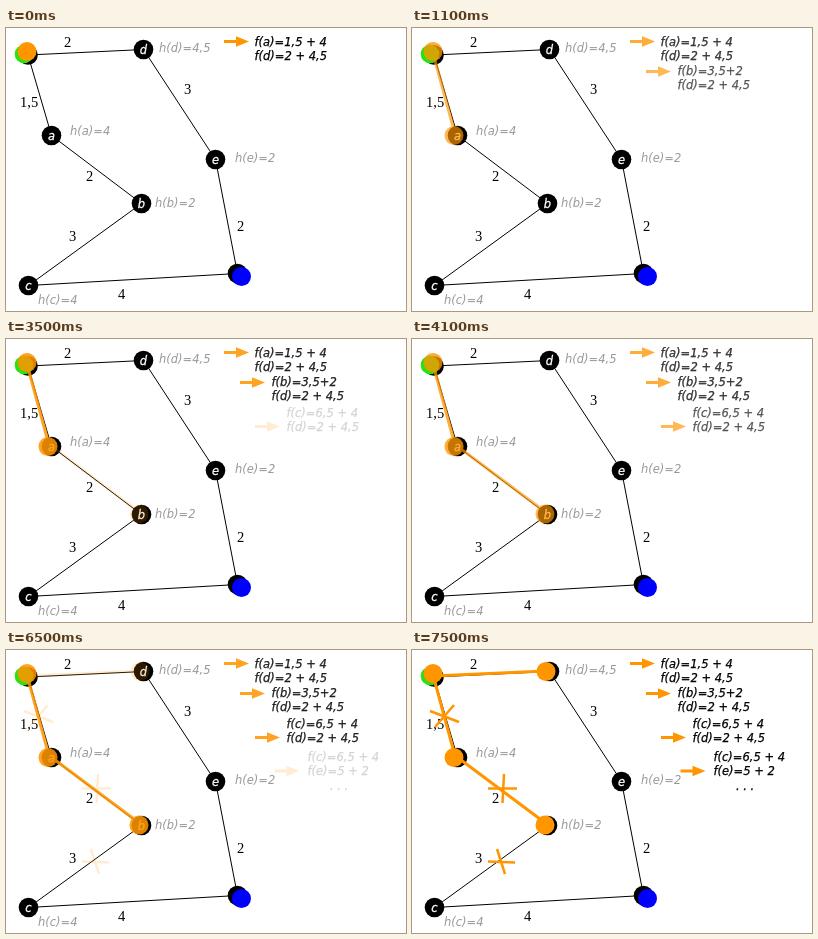
An HTML page that plays this animation: 400x283 px, repeating every 8 s.

```html
<!DOCTYPE html>
<html lang="en">
<head>
<meta charset="utf-8">
<title>Best-first path search</title>
<style>
  html, body { margin: 0; width: 100%; height: 100%; overflow: hidden; background: #fff; }
  svg { display: block; width: 400px; height: 283px; }
  text { font: italic 11.5px "DejaVu Sans", sans-serif; }
  .sum { stroke: #000; stroke-width: .25; }
  .hint { fill: #999; }
  .name { fill: #fff; stroke: #fff; stroke-width: .3; text-anchor: middle; }
  .cost { font: 14.5px "Liberation Serif", serif; }
  .edge { stroke: #000; stroke-width: 1; }
  .path { stroke: #ff9600; stroke-width: 3; }
  .cross { stroke: #ff9600; stroke-width: 2.5; }
</style>
</head>
<body>
<svg id="stage" viewBox="0 0 400 283"></svg>
<script>
const ORANGE = '#ff9600';
const stage = document.getElementById('stage');

const line = (cls, x1, y1, x2, y2) =>
  `<line class="${cls}" x1="${x1}" y1="${y1}" x2="${x2}" y2="${y2}"/>`;
const dot = (x, y, fill, r = 9.5) => `<circle cx="${x}" cy="${y}" r="${r}" fill="${fill}"/>`;
const text = (x, y, str, cls = 'sum') => `<text class="${cls}" x="${x}" y="${y}">${str}</text>`;
const arrow = (x, y) =>
  `<path fill="${ORANGE}" d="M${x} ${y - 1.5}h12v-3.8l13 5.3-13 5.3v-3.8h-12z"/>`;
const group = (id, content) => `<g id="${id}">${content}</g>`;

const nodes = {
  start: [22, 27], d: [137.5, 21.5], a: [45.5, 107.5], b: [135.5, 175.5],
  e: [209.5, 131.5], c: [22.5, 257.5], goal: [231.5, 245.5]
};
const edges = ['start d', 'start a', 'a b', 'b c', 'c goal', 'd e', 'e goal'];
const costs = [
  [58, 19, '2'], [14, 79, '1,5'], [178, 66, '3'], [80, 153, '2'],
  [63, 213, '3'], [112, 271, '4'], [231, 203, '2']
];
const hints = [
  [153, 24, 'h(d)=4,5'], [64, 107, 'h(a)=4'], [149, 179, 'h(b)=2'],
  [229, 134, 'h(e)=2'], [32, 276, 'h(c)=4']
];

const graph =
  edges.map(edge => {
    const [from, to] = edge.split(' ');
    return line('edge', ...nodes[from], ...nodes[to]);
  }).join('') +
  Object.entries(nodes).map(([name, [x, y]]) =>
    dot(x, y, '#000', 9.8) + (name.length === 1 ? text(x, y + 4, name, 'name') : '')
  ).join('') +
  costs.map(args => text(...args, 'cost')).join('') +
  hints.map(args => text(...args, 'hint')).join('') +
  dot(18, 26, '#2be10f', 9.3) + dot(235.5, 248.5, '#00f');

// What each search step adds to the picture.
const additions = [
  arrow(218, 13.5) + text(248.5, 18, 'f(a)=1,5 + 4') + text(248.5, 32, 'f(d)=2 + 4,5') +
    dot(21, 23.5, ORANGE),
  line('path', 21, 25, 43, 106) + dot(42, 107.5, ORANGE) +
    arrow(234, 43.5) + text(265.5, 47, 'f(b)=3,5+2') + text(265.5, 61, 'f(d)=2 + 4,5'),
  line('path', 43, 105.5, 134, 173.5) + dot(133, 175, ORANGE) +
    arrow(249, 87.5) + text(280.5, 78, 'f(c)=6,5 + 4') + text(280.5, 92, 'f(d)=2 + 4,5'),
  line('path', 21, 26, 134, 21) + dot(134, 21.5, ORANGE) +
    line('cross', 18, 61, 47, 72) + line('cross', 23, 77, 42, 55) +
    line('cross', 76, 138.5, 105, 138.5) + line('cross', 92, 124, 90.5, 153) +
    line('cross', 76, 211.5, 103, 212.5) + line('cross', 85, 199, 93, 224) +
    arrow(268.5, 121) + text(301.5, 111, 'f(c)=6,5 + 4') + text(301.5, 125, 'f(e)=5 + 2') +
    text(324, 139.5, '. . .')
];

stage.innerHTML = graph + additions.map((_, i) =>
  group('scene' + i, additions.slice(0, i + 1).join(''))).join('');
const scenes = additions.map((_, i) => document.getElementById('scene' + i));

// Scenes cross-fade in six stepped stages of 200 ms.
const LOOP = 8000, STAGE = 200, STAGES = 6;
const fadeStarts = [500, 3500, 6500];

function fade(time, start) {
  const stagesDone = Math.floor((time - start) / STAGE) + 1;
  return Math.max(0, Math.min(STAGES, stagesDone)) / STAGES;
}

const origin = performance.now();
function draw(now) {
  const time = Math.max(0, now - origin) % LOOP;
  scenes.forEach((scene, i) => {
    const shown = i ? fade(time, fadeStarts[i - 1]) : 1;
    const hidden = i < fadeStarts.length ? fade(time, fadeStarts[i]) : 0;
    scene.style.opacity = shown - hidden;
  });
  requestAnimationFrame(draw);
}
draw(origin);
</script>
</body>
</html>
```
